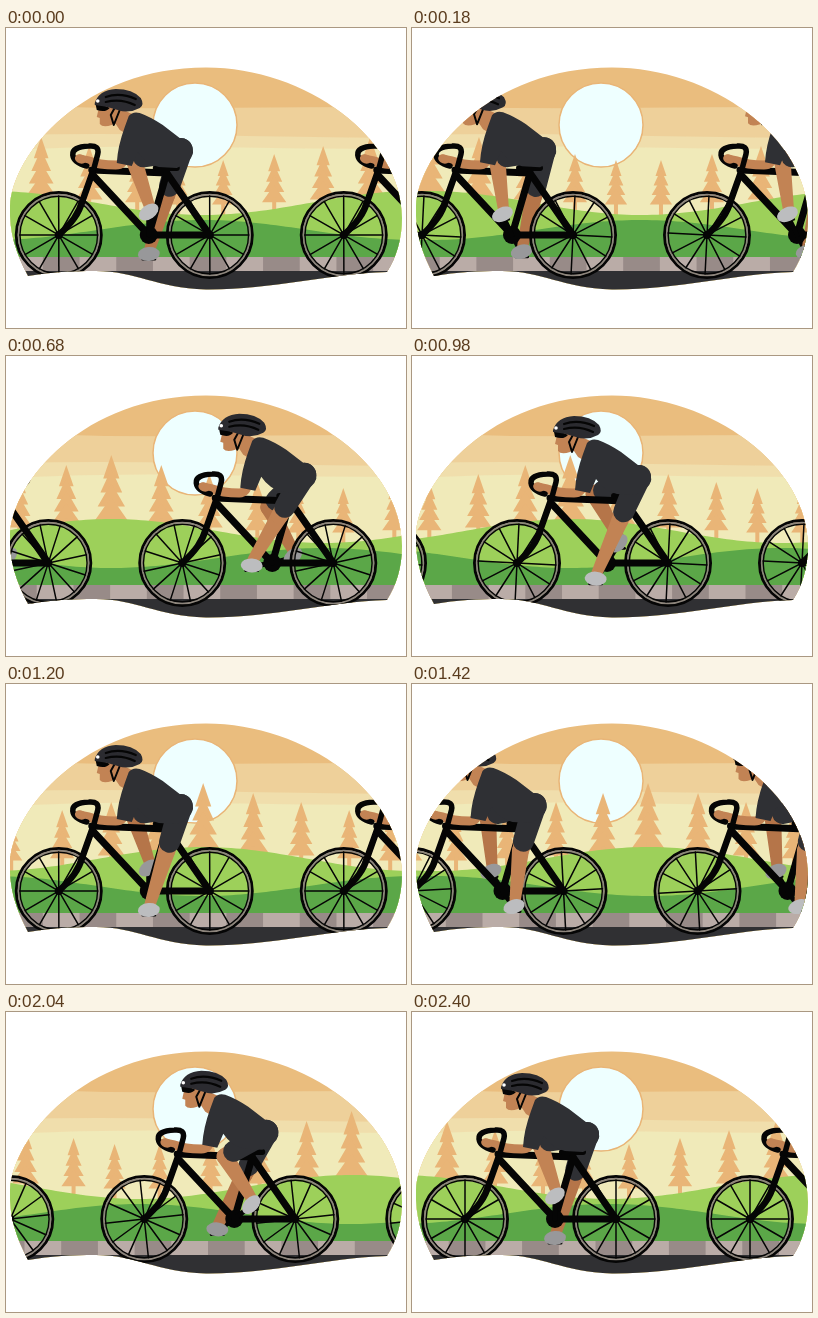
Write an HTML page with a canvas that moves like this. It is 400 by 300 pixels and loops after 2420 ms.

```html
<!DOCTYPE html>
<html lang="en">
<head>
<meta charset="utf-8">
<title>Cyclists</title>
<style>
html, body { margin: 0; height: 100%; overflow: hidden; background: #fff; }
canvas { display: block; width: 100vw; height: 100vh; }
</style>
</head>
<body>
<canvas id="stage" width="400" height="300"></canvas>
<script>
const ctx = document.getElementById('stage').getContext('2d');
const LOOP = 2420, TRAVEL = 2400, TAU = Math.PI * 2;
const BIKE_GAP = 285, HILL_PERIOD = 424, CURB_BLOCK = 36.7, WHEEL_Y = 207;
const SKIN = '#c28354', FAR_SKIN = '#b57549', CLOTH = '#2f3034', BLACK = '#050505', TREE = '#e9b577';
const TREES = [[-15, 99], [35, 109], [83, 118], [131, 126], [172, 132], [217, 132], [268, 126], [317, 118], [364, 109]];

const windowShape = new Path2D('M22 248C10 225 3 205 4 178C7 125 78 39.5 200 39.5C300 39.5 396 110 396 190C396 212 390 230 381 244' +
  'C320 246 265 262 200 261.5C150 260 130 243 90 243C65 243 45 244 22 248Z');

const mod = (a, n) => ((a % n) + n) % n;

function fill(path, color) {
  ctx.fillStyle = color;
  ctx.fill(new Path2D(path));
}

function stroke(path, color, width) {
  ctx.strokeStyle = color;
  ctx.lineWidth = width;
  ctx.stroke(new Path2D(path));
}

function ellipse(x, y, rx, ry, color, angle = 0) {
  ctx.beginPath();
  ctx.ellipse(x, y, rx, ry, angle, 0, TAU);
  ctx.fillStyle = color;
  ctx.fill();
}

function ring(x, y, r, color, width) {
  ctx.beginPath();
  ctx.arc(x, y, r, 0, TAU);
  ctx.strokeStyle = color;
  ctx.lineWidth = width;
  ctx.stroke();
}

// Limb that narrows from radius r1 to r2.
function limb(a, b, r1, r2, color) {
  const dir = Math.atan2(b.y - a.y, b.x - a.x);
  ctx.beginPath();
  ctx.arc(a.x, a.y, r1, dir + TAU / 4, dir - TAU / 4);
  ctx.arc(b.x, b.y, r2, dir - TAU / 4, dir + TAU / 4);
  ctx.fillStyle = color;
  ctx.fill();
}

function sky() {
  fill('M0 0H400V300H0Z', '#eabd7e');
  fill('M0 77Q100 81 200 80T400 79V300H0Z', '#eed09a');
  fill('M0 107Q90 105 190 107T400 110V300H0Z', '#f0deac');
  fill('M0 122Q100 117 200 119T400 121V300H0Z', '#f0eab9');
  ellipse(189, 97, 42, 42, '#eeffff');
  ring(189, 97, 42, TREE, 1.5);
}

function tree(x, top) {
  const s = 1 + (132 - top) / 70;
  for (let i = 0; i < 4; i++) {
    const y = top + i * 9.5 * s, w = (5.5 + i * 1.9) * s;
    fill(`M${x} ${y}L${x + w} ${y + 16 * s}H${x - w}Z`, TREE);
  }
  fill(`M${x - 2} ${top + 40 * s}h4V195h-4Z`, TREE);
}

function hill(shift, mid, swing, color) {
  let d = 'M0 229';
  for (let x = 0; x <= 400; x += 5)
    d += `L${x} ${mid - swing * Math.cos((x + 15 - shift) / HILL_PERIOD * TAU)}`;
  fill(d + 'V229Z', color);
}

function scenery(p) {
  sky();
  const shift = p * HILL_PERIOD, pair = 2 * CURB_BLOCK;
  for (const [x, top] of TREES) tree(mod(x + shift + 30, HILL_PERIOD) - 30, top);
  hill(shift, 175, 12, '#9dd05a');
  hill(shift, 202, -10, '#5ba748');
  fill('M0 229H400V243H0Z', '#988b88');
  for (let x = mod(5 * pair * p, pair) - pair; x < 400; x += pair)
    fill(`M${x} 229h${CURB_BLOCK}v14h${-CURB_BLOCK}Z`, '#baaca7');
  fill('M0 243H400V300H0Z', '#303033');
}

function wheel(x, angle) {
  ring(x, WHEEL_Y, 42.5, BLACK, 3);
  ring(x, WHEEL_Y, 40.3, '#8d857c', 1.8);
  ring(x, WHEEL_Y, 38.8, BLACK, 1.4);
  ctx.save();
  ctx.translate(x, WHEEL_Y);
  ctx.rotate(angle);
  for (let i = 0; i < 6; i++) {
    stroke('M-39 0H39', BLACK, 1.5);
    ctx.rotate(TAU / 12);
  }
  ctx.restore();
  ellipse(x, WHEEL_Y, 4, 4, BLACK);
}

function leg(angle, bob, skin, shoe) {
  const pedal = { x: 90 + 21 * Math.cos(angle), y: 206 + 21 * Math.sin(angle) };
  const hip = { x: 122, y: 122 + bob }, ankle = { x: pedal.x + 1, y: pedal.y - 6 };
  const dx = ankle.x - hip.x, dy = ankle.y - hip.y, thigh = 48, shin = 51;
  const reach = Math.min(Math.hypot(dx, dy), thigh + shin);
  const bend = Math.acos((thigh * thigh + reach * reach - shin * shin) / (2 * thigh * reach));
  const dir = Math.atan2(dy, dx) + bend;
  const along = d => ({ x: hip.x + d * Math.cos(dir), y: hip.y + d * Math.sin(dir) });
  const knee = along(thigh);
  stroke(`M90 207L${pedal.x} ${pedal.y}`, BLACK, 5);
  limb(knee, ankle, 8.5, 5.5, skin);
  limb(along(25), knee, 10, 8.5, skin);
  limb(hip, along(38), 12, 10.5, CLOTH);
  stroke(`M${pedal.x - 6} ${pedal.y + 4}h12`, BLACK, 3);
  ellipse(pedal.x, pedal.y - 1, 11, 7, shoe, -0.35 - 0.45 * Math.cos(angle + 0.63));
}

function frame() {
  stroke('M0 207C13 195 20 186 24 172L35 141', BLACK, 6.5);
  stroke('M33 142L108 145', BLACK, 7);
  stroke('M34 147L90 207L108 145L151 207H90', BLACK, 7);
  stroke('M97 140H118', BLACK, 6);
  ellipse(90, 207, 9, 9, BLACK);
}

function upperBody(bob) {
  stroke(`M66 ${128 + bob}Q65 137 57 137Q40 137 30 133L20 131`, SKIN, 9);
  ctx.save();
  ctx.translate(0, bob);
  fill('M50 95L60 80L78 88L68 106L61 102L57 96Z', SKIN);
  fill('M70 88Q74 83 81 85Q92 89 104 97L130 117Q135 121 134 126Q132 134 118 140L100 139' +
    'Q87 136 79 124L73 138L58 135Q59 118 66 99Z', CLOTH);
  fill('M40 80L38 89L41 90L41 96Q44 100 53 97L60 91V77H40Z', SKIN);
  stroke('M57 78L52 87L55 97L61 82', BLACK, 2);
  fill('M37 77Q43 76 51 80Q47 85 38 82Z', BLACK);
  fill('M36 75Q40 62 57 61Q74 61 82 70Q86 77 81 80Q70 86 59 82Q48 78 36 77Z', '#2b2b30');
  stroke('M47 69Q61 64 77 71M47 74Q62 70 76 77', BLACK, 2.2);
  ellipse(39, 73, 1.8, 1.8, '#fff');
  ctx.restore();
}

function cyclist(x, p) {
  const turn = -p * TAU, near = turn - TAU / 4, bob = 1.7 * (Math.cos(2 * turn) - 1);
  ctx.save();
  ctx.translate(x, 0);
  leg(near + TAU / 2, bob, FAR_SKIN, '#98989a');
  wheel(0, turn);
  wheel(151, turn);
  frame();
  leg(near, bob, SKIN, '#bcbdbf');
  upperBody(bob);
  stroke('M35 141L39 126Q41 117 30 118Q13 119 14 127Q15 135 28 138', BLACK, 5.5);
  ellipse(22, 131, 6, 4.5, SKIN, 0.3);
  ctx.restore();
}

function draw(now) {
  const p = Math.min(now % LOOP, TRAVEL) / TRAVEL;
  ctx.clearRect(0, 0, 400, 300);
  ctx.save();
  ctx.lineCap = ctx.lineJoin = 'round';
  ctx.clip(windowShape);
  scenery(p);
  const first = mod(53 - 2 * BIKE_GAP * p, BIKE_GAP);
  for (let i = -1; i < 2; i++) cyclist(first + i * BIKE_GAP, p);
  ctx.restore();
}

const start = performance.now();
function tick() {
  draw(performance.now() - start);
  requestAnimationFrame(tick);
}
tick();
</script>
</body>
</html>
```
